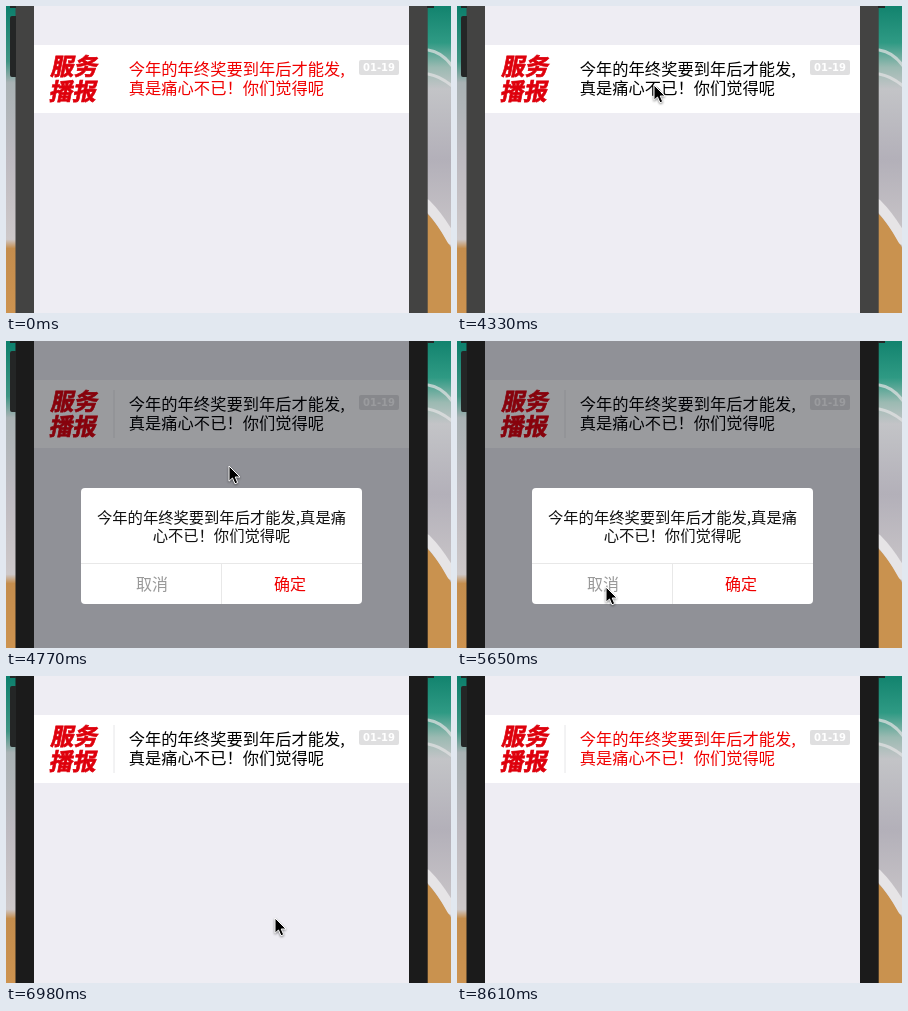
An HTML page for the animation above (9050 ms loop, 445 px wide and 307 px high).

```html
<!DOCTYPE html>
<html lang="zh-CN">
<head>
<meta charset="utf-8">
<title>服务播报</title>
<style>
  html, body { margin: 0; width: 100%; height: 100%; overflow: hidden; }
  svg { display: block; width: 445px; height: 307px; }
  text { font-family: "Noto Sans CJK SC", "Noto Sans CJK", sans-serif; }
  .logo { font-size: 23.5px; font-weight: 900; fill: #de000c; stroke: #de000c; stroke-width: .7; text-anchor: middle; }
  .news { font-size: 16.28px; fill: currentColor; }
  .date { font: bold 10px "DejaVu Sans", sans-serif; fill: #fff; text-anchor: middle; }
  .body { font-size: 15.3px; fill: #111; text-anchor: middle; }
  .button { font-size: 16px; fill: #999; text-anchor: middle; }
  #cursor { filter: drop-shadow(0 1px 1px #0007); }
</style>
</head>
<body>
<svg viewBox="0 0 445 307">
  <defs>
    <linearGradient id="leftBeach" x2="0" y2="1">
      <stop offset="0" stop-color="#0b7f6c"/>
      <stop offset=".18" stop-color="#3f9483"/>
      <stop offset=".25" stop-color="#a9b2b4"/>
      <stop offset=".5" stop-color="#bdbac0"/>
      <stop offset=".76" stop-color="#cdc8c9"/>
      <stop offset=".79" stop-color="#c48d4d"/>
      <stop offset="1" stop-color="#cd9350"/>
    </linearGradient>
    <linearGradient id="rightBeach" x2="0" y2="1">
      <stop offset="0" stop-color="#12836e"/>
      <stop offset=".12" stop-color="#2f9a84"/>
      <stop offset=".2" stop-color="#9bbab2"/>
      <stop offset=".27" stop-color="#c3c4c7"/>
      <stop offset=".5" stop-color="#b3b0b9"/>
      <stop offset=".75" stop-color="#c9c5c8"/>
    </linearGradient>
    <clipPath id="card"><path d="M28 39H403V107H28Z"/></clipPath>
    <g id="item">
      <text class="news" x="122.8" y="69.2">今年的年终奖要到年后才能发,</text>
      <text class="news" x="122.8" y="88.2">真是痛心不已！你们觉得呢</text>
      <rect x="353" y="54" width="40" height="15" rx="2" fill="#dfdfe0"/>
      <text class="date" x="373" y="65.4">01-19</text>
    </g>
  </defs>

  <rect width="28" height="307" fill="url(#leftBeach)"/>
  <rect x="403" width="42" height="307" fill="url(#rightBeach)"/>
  <path d="M420 206Q432 218 446 243V307H420Z" fill="#c9924f"/>
  <g fill="none" stroke="#e6e4e6" stroke-linecap="round">
    <path d="M422 44Q436 46 446 60M422 68Q434 70 446 80" stroke-width="3" opacity=".7"/>
    <path d="M420 198Q434 212 446 234" stroke-width="10"/>
  </g>
  <g id="frame">
    <path d="M9.5 0H28V307H9.5ZM403 0H421.7V307H403Z"/>
    <path d="M4 12Q4 10 6 10H10V71H6Q4 71 4 69ZM4 0H10V2H4ZM421 0H428V2H421Z" fill="#242626"/>
  </g>

  <path d="M28 0H403V307H28Z" fill="#eeedf3"/>
  <path d="M28 39H403V107H28Z" fill="#fff"/>
  <text class="logo" transform="translate(69.5 69.3) skewX(-11)" x="-2">服务</text>
  <text class="logo" transform="translate(68.2 93.6) skewX(-11)" x="-2">播报</text>
  <path id="divider" d="M108 49V97" stroke="#e6e6e8"/>
  <g clip-path="url(#card)">
    <g id="list">
      <use href="#item" color="#f00000"/>
      <use href="#item" y="68" color="#000"/>
      <use href="#item" y="136" color="#f00000"/>
    </g>
  </g>

  <path id="dim" d="M28 0H403V307H28Z" fill="#04060e"/>
  <g id="dialog">
    <rect x="75" y="147" width="281" height="116" rx="4" fill="#fff"/>
    <text class="body" x="215.5" y="181.5">今年的年终奖要到年后才能发,真是痛</text>
    <text class="body" x="215.5" y="200">心不已！你们觉得呢</text>
    <path d="M75 222.5H356M215.5 222V263" stroke="#e8e8e8"/>
    <text class="button" x="146" y="249">取消</text>
    <text class="button" id="ok" x="284" y="249" style="fill:#f00000">确定</text>
  </g>
  <path id="cursor" d="M0 0V15.2L3.5 12 6 17.8 8.7 16.6 6.2 11H11Z" stroke="#fff"/>
</svg>

<script>
  const LOOP = 9050, START = 3300, TICK = 147.3;
  const $ = id => document.getElementById(id);
  const clamp = v => Math.max(0, Math.min(1, v));

  // Keys are [tick, value, ...]
  const path = [
    [3, 226, 218], [4, 219, 186], [5, 209, 146], [6, 200, 110], [7, 197, 79],
    [8, 197, 79], [10, 223, 125], [12, 208, 182], [14, 162, 240],
    [15, 152, 246], [17, 146, 246], [18, 146, 246], [22, 269, 242],
    [25, 269, 242], [26, 275, 247], [28, 336, 285]
  ];
  const fade = [[7, 0], [10, 1], [22, 1], [23, .88], [24, .3], [25, 0]];

  function sample(keys, k) {
    const i = keys.findIndex(key => key[0] >= k);
    if (i < 0) return keys[keys.length - 1].slice(1);
    if (i === 0) return keys[0].slice(1);
    const a = keys[i - 1], b = keys[i];
    const p = (k - a[0]) / (b[0] - a[0]);
    return a.slice(1).map((v, n) => v + (b[n + 1] - v) * p);
  }

  // Height scrolled, k ticks after a scroll began
  function scroll(k) {
    if (k < 0) return 0;
    return 34 * (1 - Math.cos(Math.PI * clamp(.34 + .295 * k)));
  }

  function draw(now) {
    const t = now % LOOP;
    // The picture advances in steps of one tick
    const k = t < START ? -1 : Math.floor((t - START) / TICK + .06);
    const [alpha] = sample(fade, k);
    const [x, y] = sample(path, k);

    $("list").setAttribute("transform", `translate(0 ${-scroll(k) - scroll(k - 33)})`);
    $("frame").setAttribute("fill", k < 8 ? "#434342" : "#1b1b1b");
    $("divider").setAttribute("opacity", k < 8 ? 0 : 1);
    $("dim").setAttribute("opacity", alpha * .4);
    $("dialog").setAttribute("opacity", alpha);
    $("ok").setAttribute("opacity", k < 23 ? 1 : .45);
    $("cursor").setAttribute("transform", `translate(${x} ${y})`);
    $("cursor").setAttribute("opacity", k >= 3 && k < 29 ? 1 : 0);
  }

  const origin = performance.now();
  (function tick() {
    draw(performance.now() - origin);
    requestAnimationFrame(tick);
  })();
</script>
</body>
</html>
```
